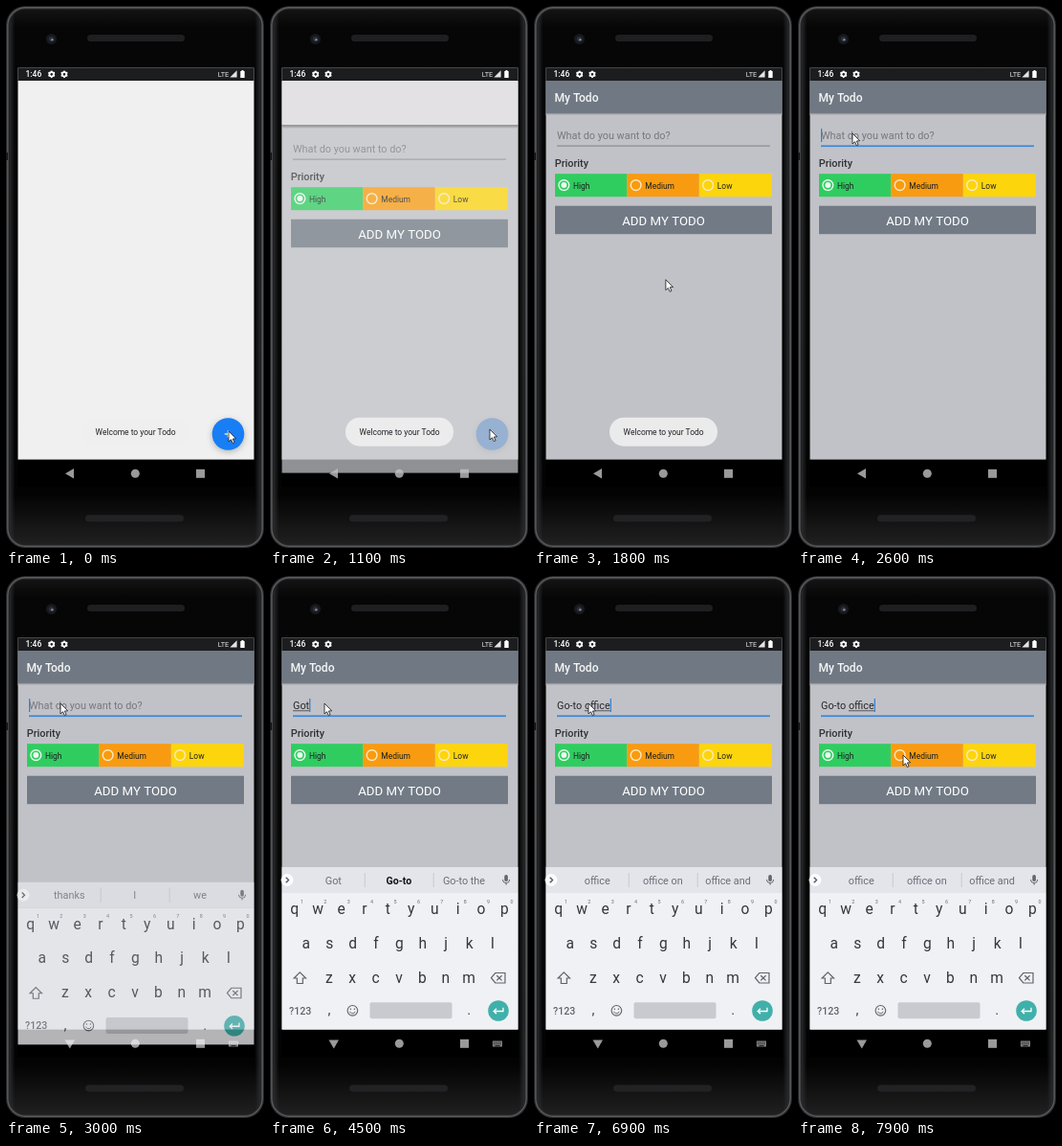
Write an HTML page with a canvas that moves like this. It is 270 by 566 pixels and loops after 8 s.

```html
<!DOCTYPE html>
<html lang="en">
<head>
<meta charset="utf-8">
<title>Todo app demo</title>
<style>
  html, body { margin: 0; width: 100%; height: 100%; overflow: hidden; background: #000; }
  canvas { display: block; width: 270px; height: 566px; }
</style>
</head>
<body>
<canvas id="stage"></canvas>
<script>
const W = 270, H = 566, LOOP = 8000;
const canvas = document.getElementById('stage');
const backdrop = document.createElement('canvas');
const ratio = window.devicePixelRatio || 1;
canvas.width = backdrop.width = W * ratio;
canvas.height = backdrop.height = H * ratio;
const ctx = canvas.getContext('2d');
const backdropCtx = backdrop.getContext('2d');

const SCREEN = { left: 12.5, right: 259.5, top: 64.6, bottom: 473.6 };
const BODY = 10.85;
const SMALL = 8.45;

// start time, committed text, word being composed, suggestions, bold middle
const typing = [
  [0, '', '', ['thanks', 'I', 'we'], false],
  [3600, '', 'G', ['G', 'Good', 'Go'], false],
  [4000, '', 'Go', ['Go', 'Good', 'Got'], false],
  [4450, '', 'Got', ['Got', 'Go-to', 'Go-to the'], true],
  [4550, '', 'Goto', ['Goto', 'Go-to', 'Go-to the'], true],
  [4850, 'Go-to ', '', ['the', 'bed', 'sleep'], false],
  [5700, 'Go-to ', 'o', ['o', 'office', 'of'], true],
  [6100, 'Go-to ', 'of', ['of', 'office', 'off'], false],
  [6400, 'Go-to ', 'off', ['off', 'office', 'offer'], false],
  [6600, 'Go-to ', 'offi', ['offi', 'office', 'official'], true],
  [6750, 'Go-to ', 'offic', ['offic', 'office', 'officer'], true],
  [6850, 'Go-to ', 'office', ['office', 'office on', 'office and'], false],
];
const FOCUS_AT = 2600;

// time, x, y of the pointer tip
const pointerPath = [
  [0, 233, 444], [900, 233, 444], [1300, 227, 440], [1800, 138, 286],
  [2400, 57, 133], [7200, 57, 133], [7800, 110, 187], [LOOP, 110, 187],
];

const clamp = v => Math.max(0, Math.min(1, v));
const progress = (t, from, to) => clamp((t - from) / (to - from));

function rect(x, y, w, h, fill) {
  ctx.fillStyle = fill;
  ctx.fillRect(x, y, w, h);
}

// A strip across the whole screen of the phone.
function band(top, bottom, fill) {
  rect(SCREEN.left, top, SCREEN.right - SCREEN.left, bottom - top, fill);
}

function pill(x, y, w, h, r, fill, stroke, width = 1) {
  ctx.beginPath();
  ctx.roundRect(x, y, w, h, r);
  paint(fill, stroke, width);
}

function circle(x, y, r, fill, stroke, width = 1) {
  ctx.beginPath();
  ctx.arc(x, y, r, 0, Math.PI * 2);
  paint(fill, stroke, width);
}

function poly(points, fill, stroke, width = 1, closed = true) {
  ctx.beginPath();
  points.forEach(([x, y]) => ctx.lineTo(x, y));
  if (closed) ctx.closePath();
  paint(fill, stroke, width);
}

function paint(fill, stroke, width) {
  if (fill) { ctx.fillStyle = fill; ctx.fill(); }
  if (stroke) { ctx.strokeStyle = stroke; ctx.lineWidth = width; ctx.stroke(); }
}

function gradient(x0, y0, x1, y1, stops) {
  const g = ctx.createLinearGradient(x0, y0, x1, y1);
  stops.forEach(([at, color]) => g.addColorStop(at, color));
  return g;
}

function text(str, x, y, size, color, align = 'left', weight = 400) {
  ctx.font = `${weight} ${size}px Roboto, sans-serif`;
  ctx.textAlign = align;
  ctx.fillStyle = color;
  ctx.fillText(str, x, y);
}

function withShadow(color, blur, dy, draw) {
  ctx.save();
  ctx.shadowColor = color;
  ctx.shadowBlur = blur * ratio;
  ctx.shadowOffsetY = dy * ratio;
  draw();
  ctx.restore();
}

function drawPhone() {
  rect(0, 0, W, H, '#000');
  pill(0, 0, W, H, 20, '#28292b');
  pill(1.8, 1.8, W - 3.6, H - 3.6, 18.5, null, '#5a5b5d', 1.4);
  pill(3.5, 3.5, W - 7, H - 7, 17,
    gradient(0, 0, 0, H, [[0, '#161617'], [.04, '#060607'], [.9, '#030304'], [1, '#222223']]));
  pill(3.5, 3.5, W - 7, H - 7, 17,
    gradient(0, 0, W, 0, [[.012, '#2a2b2c'], [.035, '#2a2b2c00'], [.965, '#2a2b2c00'], [.988, '#2a2b2c']]));
  rect(0, 153, 2, 8, '#17181a');
  circle(47.5, 34.5, 5.5, '#17191d');
  circle(47.5, 34.5, 2.8, '#2a2d3a');
  circle(48.3, 35.3, 1.3, '#7b8198');
  pill(85, 30, 102, 7, 3.5, '#1f1f21');
  pill(83, 531.5, 103, 7, 3.5, '#222224');
}

function gear(x, y) {
  for (let i = 0; i < 6; i++) {
    const a = i * Math.PI / 3 + Math.PI / 6;
    circle(x + Math.cos(a) * 2.8, y + Math.sin(a) * 2.8, 1.1, '#fff');
  }
  circle(x, y, 2.2, null, '#fff', 1.7);
}

function drawStatusBar() {
  band(SCREEN.top, 78, '#1c1d1e');
  text('1:46', 20.5, 74.4, 8.5, '#fff', 'left', 500);
  gear(47.7, 71.3);
  gear(61, 71.3);
  text('LTE', 221.7, 74, 7.3, '#e4e4e4');
  poly([[234.4, 74.5], [241.6, 74.5], [241.6, 67.3]], '#e4e4e4');
  rect(245.3, 68, 4.4, 7, '#fff');
  rect(246.5, 67, 2, 1, '#fff');
}

function drawNavBar(keyboardOpen) {
  const grey = '#9a9a9a';
  band(SCREEN.bottom, 502, '#000');
  poly(keyboardOpen
    ? [[61.5, 484.5], [72, 484.5], [66.8, 493.5]]
    : [[71, 483], [71, 493.5], [62, 488.2]], grey);
  circle(135.3, 488.2, 4.5, grey);
  rect(199, 483.8, 9, 9, grey);
  if (keyboardOpen) {
    rect(233, 485.5, 10, 6, '#858585');
    for (let i = 0; i < 4; i++) {
      rect(234.2 + i * 2.1, 486.7, 1, 1, '#000');
      rect(234.2 + i * 2.1, 488.4, 1, 1, '#000');
    }
    rect(235.5, 490, 5, .7, '#000');
  }
}

function drawHome() {
  band(SCREEN.top, SCREEN.bottom, '#f0f0f0');
  withShadow('rgba(0,0,0,.25)', 6, 2, () => circle(232.5, 447, 16.8, '#177ef5'));
  rect(228.8, 446.4, 7, 1.2, '#fff');
  rect(231.8, 443.5, 1.2, 7, '#fff');
}

function drawRadio(x, color, width, label, selected) {
  const ring = selected ? '#eef8f0' : '#fdeac4';
  rect(x, 175.2, width, 24, color);
  circle(x + 9.3, 187.1, 5.4, null, ring, 1.4);
  if (selected) circle(x + 9.3, 187.1, 3, ring);
  text(label, x + 19, 190.5, SMALL, '#1d1e20');
}

function drawInput(t, state) {
  const [since, committed, word] = state;
  const focused = t >= FOCUS_AT;
  const x = 24, baseline = 138.8;
  if (!committed && !word) text('What do you want to do?', x, baseline, BODY, '#75777c');
  text(committed, x, baseline, BODY, '#25272b');
  const wordX = x + ctx.measureText(committed).width;
  text(word, wordX, baseline, BODY, '#25272b');
  const wordWidth = ctx.measureText(word).width;
  if (word) rect(wordX, baseline + 1.6, wordWidth, .8, '#3a3c40');
  if (!focused) {
    rect(x, 145.6, 223, 1, '#7f8186');
    return;
  }
  rect(x, 145.4, 223, 1.7, '#3d86d6');
  const lastInput = Math.max(since, FOCUS_AT);
  if ((t - lastInput) % 1000 < 500) rect(wordX + wordWidth, 128, 1.2, 14, '#2f7fd8');
}

function drawTodoPage(t, state, settled) {
  band(SCREEN.top, SCREEN.bottom, '#c1c2c7');
  band(109, 114, gradient(0, 109, 0, 114, [[0, '#6b6e73'], [.55, '#85878b'], [1, '#c1c2c7']]));
  band(SCREEN.top, settled ? 111.8 : 110, settled ? '#707983' : '#dfdde1');
  if (settled) text('My Todo', 21.5, 99.6, 12.06, '#f5f6f7', 'left', 500);
  drawInput(t, state);
  text('Priority', 21.8, 167.7, BODY, '#2f3135', 'left', 500);
  drawRadio(22, '#2fcd60', 75.3, 'High', true);
  drawRadio(97.3, '#f89b10', 75.5, 'Medium', false);
  drawRadio(172.8, '#fcd50c', 76, 'Low', false);
  rect(22, 208.7, 227, 29.5, '#717a85');
  text('ADD MY TODO', 135.5, 228.6, 13.27, '#fff', 'center');
}

function drawToast(t) {
  const alpha = 1 - progress(t, 2150, 2450);
  if (!alpha) return;
  ctx.save();
  ctx.globalAlpha = alpha * .9;
  pill(79, 429.7, 113, 30, 15, '#f0f0f0');
  ctx.globalAlpha = alpha;
  text('Welcome to your Todo', 135.6, 447.8, SMALL, '#202124', 'center');
  ctx.restore();
}

function drawKeyRow(letters, x, y, digits) {
  [...letters].forEach((letter, i) => {
    const keyX = x + i * 24.4;
    text(letter, keyX, y, 15.6, '#34373c', 'center');
    if (digits) text((i + 1) % 10, keyX + 7.6, y - 11.5, 5.4, '#6a6d73', 'center');
  });
}

function drawSuggestions(words, bold) {
  band(304, 331, '#e3e5ea');
  circle(18, 317.5, 6.5, '#fbfbfd');
  poly([[16.7, 314.7], [19.5, 317.5], [16.7, 320.3]], null, '#4d5157', 1.3, false);
  [66.3, 134.8, 203].forEach((x, i) => {
    const strong = bold && i === 1;
    text(words[i], x, 321.5, strong ? 10.6 : BODY, strong ? '#101114' : '#6a6e75', 'center', strong ? 700 : 400);
  });
  rect(98.7, 310, 1, 15, '#c8cacf');
  rect(170.7, 310, 1, 15, '#c8cacf');
  pill(245.3, 312, 3.6, 7, 1.8, '#63676d');
  ctx.beginPath();
  ctx.arc(247.1, 317, 3.6, 0, Math.PI);
  paint(null, '#63676d', 1);
  rect(246.6, 320.5, 1, 2.2, '#63676d');
}

function drawKeyboard(state) {
  const grey = '#5f6369';
  band(331, SCREEN.bottom, '#f0f1f5');
  drawSuggestions(state[3], state[4]);
  drawKeyRow('qwertyuiop', 25.8, 353, true);
  drawKeyRow('asdfghjkl', 37.8, 388.5);
  drawKeyRow('zxcvbnm', 61.8, 424.5);

  poly([[31.3, 413.8], [37.5, 420], [34.3, 420], [34.3, 425.5], [28.3, 425.5], [28.3, 420], [25.1, 420]], null, grey, 1.2);
  poly([[231.5, 419.7], [235.8, 414.5], [246, 414.5], [246, 425], [235.8, 425]], null, grey, 1.2);
  poly([[237.3, 417.2], [242.6, 422.4]], null, grey, 1.2, false);
  poly([[242.6, 417.2], [237.3, 422.4]], null, grey, 1.2, false);

  text('?123', 31.7, 457.6, 10.6, grey, 'center', 500);
  text(',', 62, 458, 15, '#45484e', 'center');
  text('.', 208.3, 458, 15, '#45484e', 'center');
  circle(86.4, 453.8, 5.3, null, grey, 1.1);
  circle(84.4, 452.3, .8, grey);
  circle(88.4, 452.3, .8, grey);
  ctx.beginPath();
  ctx.arc(86.4, 454, 2.9, .3, Math.PI - .3);
  paint(null, grey, 1);
  pill(104.5, 445.3, 86, 17, 2, '#c8cacf');

  circle(239, 454, 10.8, '#40b0aa');
  poly([[244, 450.8], [244, 454.5], [234.5, 454.5]], null, '#fff', 1.3, false);
  poly([[237, 451.7], [234.2, 454.5], [237, 457.3]], null, '#fff', 1.3, false);
}

function drawPointer(t) {
  const i = pointerPath.findIndex(([time]) => time > t);
  const [t0, x0, y0] = pointerPath[i - 1];
  const [t1, x1, y1] = pointerPath[i];
  const p = progress(t, t0, t1);
  ctx.save();
  ctx.translate(x0 + (x1 - x0) * p, y0 + (y1 - y0) * p);
  poly([[0, 0], [0, 11], [2.5, 8.7], [4.3, 12.6], [6.1, 11.8], [4.4, 8], [7.7, 7.8]], '#fff', '#2b2b2e', .9);
  ctx.restore();
}

// Draws a layer shifted down, then lays the old picture back over it,
// so that overlapping parts of the layer fade as one.
function fadeLayer(offset, alpha, draw) {
  if (alpha < 1) backdropCtx.drawImage(canvas, 0, 0);
  ctx.save();
  ctx.translate(0, offset);
  draw();
  ctx.restore();
  if (alpha < 1) {
    ctx.save();
    ctx.globalAlpha = 1 - alpha;
    ctx.drawImage(backdrop, 0, 0, W, H);
    ctx.restore();
  }
}

function render(t) {
  const state = typing.filter(([time]) => time <= t).pop();
  const page = progress(t, 800, 1570);
  const keys = progress(t, 2750, 3300);
  const settled = page === 1;

  ctx.setTransform(ratio, 0, 0, ratio, 0, 0);
  drawPhone();
  drawNavBar(keys > 0);
  if (!settled) {
    drawHome();
    drawStatusBar();
  }
  if (page > 0) {
    fadeLayer(23 * (1 - page), clamp((t - 800) / 400), () => drawTodoPage(t, state, settled));
  }
  if (settled) drawStatusBar();
  drawToast(t);
  if (keys > 0) fadeLayer(29 * (1 - keys), clamp(keys * 1.65), () => drawKeyboard(state));
  drawPointer(t);
}

function tick(now) {
  render(now % LOOP);
  requestAnimationFrame(tick);
}
render(0);
requestAnimationFrame(tick);
</script>
</body>
</html>
```
